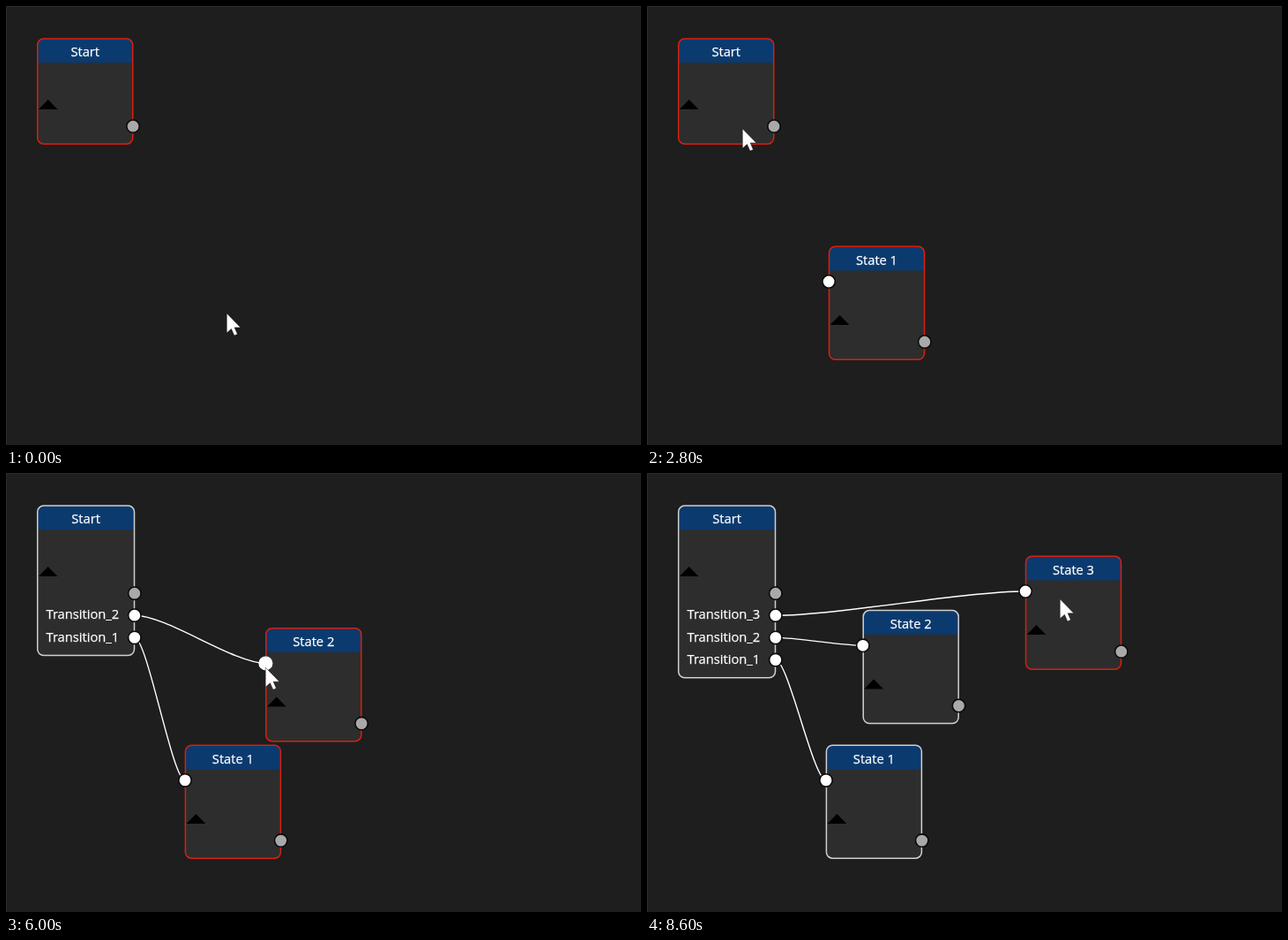
Write an HTML page that moves like this. It is 720 by 497 pixels and loops after 8800 ms.

```html
<!DOCTYPE html>
<html lang="en">
<head>
<meta charset="utf-8">
<title>State graph editor</title>
<style>
  html, body { margin: 0; width: 100%; height: 100%; overflow: hidden; background: #1e1e1e; }
  svg { display: block; width: 720px; height: 497px; }
  text {
    font: 14.7px "Open Sans", "Noto Sans", sans-serif;
    fill: #fff; stroke: #fff; stroke-width: .25px;
  }
</style>
</head>
<body>
<svg id="stage" viewBox="0 0 720 497"></svg>
<script>
const LOOP = 8800, STEP = 200;
const MENU_WIDTH = 168, STATE_WIDTH = 108, ROW = 25.2;
const OUT_Y = 136.2;
const stage = document.getElementById('stage');

// Each state is opened from a menu, linked to Start by a wire, and dragged about.
const states = [
  { open: 1000, grab: 3000, drop: 3800, spot: [147.3, 227.2], drags: [
    { from: 1800, to: 2600, end: [206.5, 272.3], grip: [38, 56] },
    { from: 4000, to: 4400, end: [205.3, 309.4], grip: [26, 40] },
    { from: 4400, to: 4600, end: [203.4, 308.2], grip: [26, 40] }] },
  { open: 5000, grab: 5600, drop: 6000, spot: [287.8, 172.2], drags: [
    { from: 6200, to: 6400, end: [245.2, 155.6], grip: [8, -10] }] },
  { open: 6600, grab: 7200, drop: 8000, spot: [558.3, 140.1], drags: [
    { from: 8400, to: 8600, end: [429.5, 94.3], grip: [38.5, 48.5] }] }
];

const add = (a, b) => [a[0] + b[0], a[1] + b[1]];
const mix = (a, b, p) => [a[0] + (b[0] - a[0]) * p, a[1] + (b[1] - a[1]) * p];
const progress = (t, from, to) => Math.min(1, Math.max(0, (t - from) / (to - from)));

function place(state, t) {
  return state.drags.reduce(
    (pos, d) => mix(pos, d.end, progress(t, d.from, d.to)),
    add(state.spot, [7, 3.5]));
}

function isSelected(n, t) {
  const s = states[n], next = states[n + 1];
  return t >= Math.min(s.drop, s.drags[0].from) && !(next && t >= next.drags[0].from);
}

function makeTrail() {
  const trail = [
    { t: 0, pos: [250, 348] }, { t: 2800, pos: [108, 139] }, { t: 7000, pos: [253, 145] }
  ];
  for (const s of states) {
    trail.push(
      { t: s.open, pos: s.spot },
      { t: s.open + STEP, pos: add(s.spot, [-115, 20]) },
      { t: s.grab, pos: [146, OUT_Y] },
      { t: s.drop, pos: add(place(s, s.drop), [-0.8, 44.5]) });
    for (const d of s.drags)
      for (const t of [d.from, d.to]) trail.push({ t, pos: add(place(s, t), d.grip) });
  }
  return trail.sort((a, b) => a.t - b.t);
}
const trail = makeTrail();

function pointerAt(t) {
  const n = trail.findIndex(k => k.t > t);
  if (n < 0) return trail[trail.length - 1].pos;
  const a = trail[n - 1], b = trail[n];
  return mix(a.pos, b.pos, progress(t, a.t, b.t));
}

const label = (x, y, str, anchor = 'start') =>
  `<text x="${x}" y="${y}" text-anchor="${anchor}">${str}</text>`;

function pin(x, y, lit, pointer) {
  const hover = lit && Math.hypot(pointer[0] - x, pointer[1] - y) < 7;
  return hover
    ? `<circle cx="${x}" cy="${y}" r="8" fill="#fff"/>`
    : `<circle cx="${x}" cy="${y}" r="7.2" fill="${lit ? '#fff' : '#a9a9a9'}" stroke="#0a0a0a" stroke-width="1.6"/>`;
}

function wire(x1, y1, x2, y2) {
  const bend = (x2 - x1) * 0.25;
  return `<path d="M${x1} ${y1}C${x1 + bend} ${y1} ${x2 - bend} ${y2} ${x2} ${y2}" fill="none" stroke="#fff" stroke-width="1.4"/>`;
}

function box(x, y, w, h, name, selected, arrowY) {
  return `<rect x="${x}" y="${y}" width="${w}" height="${h}" rx="7" fill="#2d2d2d"/>
    <path d="M${x} ${y + 27.2}v-20a7 7 0 0 1 7-7h${w - 14}a7 7 0 0 1 7 7v20z" fill="#0b3a6e"/>
    <rect x="${x}" y="${y}" width="${w}" height="${h}" rx="7" fill="none" stroke="${selected ? '#d9200f' : '#d0d0d0'}" stroke-width="1.5"/>
    <path d="M${x + 1.2} ${y + arrowY}l10.8-11 10.8 11z"/>
    ${label(x + w / 2, y + 20.3, name, 'middle')}`;
}

function menu([right, y], age) {
  if (age < 0 || age > 2 * STEP) return '';
  const opacity = age > STEP ? 0.15 : 1;
  return `<g opacity="${opacity}" transform="translate(${Math.max(0, right - MENU_WIDTH)} ${y})">
    <rect x=".5" y=".5" width="${MENU_WIDTH - 1}" height="58" fill="#1b1b1c" stroke="#333337"/>
    ${label(24.5, 23, 'Add')}${label(80.5, 24, 'Ctrl + N')}
    ${label(24.5, 49.5, 'Delete')}${label(80.5, 50.5, 'Delete')}</g>`;
}

function cursor([x, y]) {
  return `<path transform="translate(${x + 0.3} ${y}) scale(1.1)" d="M0 0V20L4.7 15.9 7.8 22.8 11 21.4 8 14.5H14.2Z" fill="#fff" stroke="#111" stroke-width=".4"/>`;
}

function draw(t) {
  const pointer = pointerAt(t);
  const count = states.filter(s => t >= s.drop).length;
  const width = count ? 109.8 : 108;
  const right = 35.7 + width;
  let wires = '', pins = pin(right + 0.3, OUT_Y, false, pointer), popups = '';
  let boxes = box(35.7, 37.1, width, 119.1 + ROW * count, 'Start', !count, 79.9);

  states.forEach((s, n) => {
    popups += menu(s.spot, t - s.open);
    if (t > s.grab && t < s.drop) wires += wire(right, OUT_Y, ...pointer);
    if (t < s.open + 2 * STEP) return;

    const [x, y] = place(s, t);
    const linked = t >= s.drop, selected = isSelected(n, t);
    boxes += box(x, y, STATE_WIDTH, 128, `State ${n + 1}`, selected, 88.8);
    pins += pin(x - 0.4, y + 39.7, linked || selected, pointer);
    pins += pin(x + STATE_WIDTH + 0.3, y + 107.9, false, pointer);
    if (!linked) return;

    // The newest transition takes the top row.
    const rowY = 161.2 + ROW * (count - 1 - n);
    wires += wire(right + 0.3, rowY, x - 0.4, y + 39.7);
    boxes += label(45.5, rowY + 4.2, `Transition_${n + 1}`);
    pins += pin(right + 0.3, rowY, true, pointer);
  });

  stage.innerHTML = `<rect width="720" height="497" fill="#1e1e1e"/>
    <path d="M.5 497V.5H720" fill="none" stroke="#2b2b2b"/>
    ${wires}${boxes}${pins}${popups}${cursor(pointer)}`;
}

let shown = -1;
const begin = performance.now();
function tick() {
  const t = Math.floor((performance.now() - begin) % LOOP / STEP) * STEP;
  if (t !== shown) draw(shown = t);
  requestAnimationFrame(tick);
}
tick();
</script>
</body>
</html>
```
